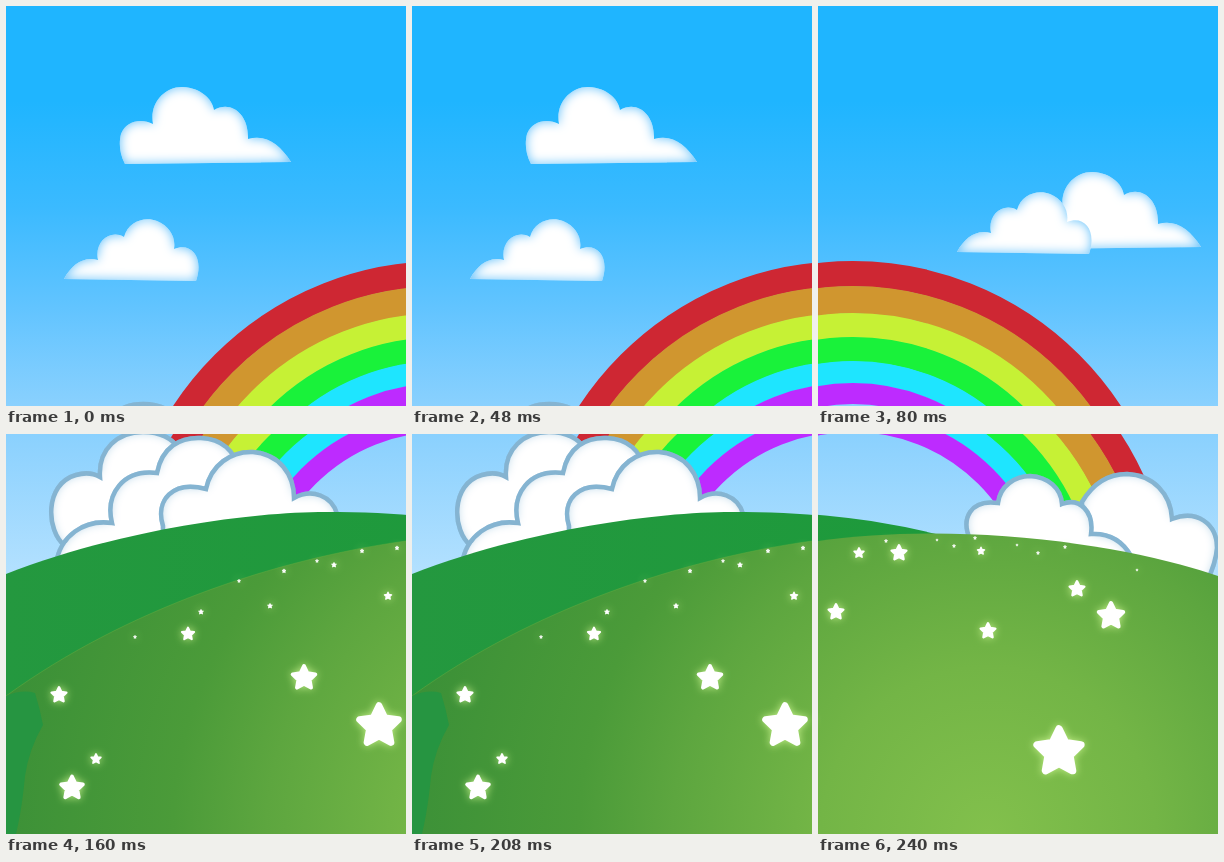
An HTML page that plays this animation: 400x400 px, repeating every 320 ms.

```html
<!DOCTYPE html>
<html lang="en">
<head>
<meta charset="utf-8">
<title>Rainbow meadow</title>
<style>
  html, body { margin: 0; width: 100%; height: 100%; overflow: hidden; }
  body { position: relative; background: #1fb5ff; }
  svg {
    position: absolute; left: 0; top: 0; width: 200%; height: 200%;
    will-change: transform;
    animation: look 320ms step-end infinite;
  }
  /* The view jumps between the four quarters of the scene. */
  @keyframes look {
    0%   { transform: translate(0, 0); }
    25%  { transform: translate(-50%, 0); }
    50%  { transform: translate(0, -50%); }
    75%  { transform: translate(-50%, -50%); }
    100% { transform: translate(-50%, -50%); }
  }
  #rainbow { fill: none; }
  .high { fill: #fff; filter: url(#airy); }
  .low path { fill: #fff; stroke: #86b3cf; stroke-width: 4.5; filter: url(#shaded); }
  #stars { fill: #fff; stroke: #fff; stroke-linejoin: round; filter: url(#glow); }
</style>
</head>
<body>
<svg viewBox="0 0 800 800">
  <defs>
    <linearGradient id="sky" gradientUnits="userSpaceOnUse" x1="0" y1="0" x2="0" y2="560">
      <stop offset=".17" stop-color="#1fb5ff"/>
      <stop offset=".36" stop-color="#3bbaff"/>
      <stop offset=".54" stop-color="#62c4ff"/>
      <stop offset=".72" stop-color="#8bd1fe"/>
      <stop offset="1" stop-color="#b9e3ff"/>
    </linearGradient>
    <radialGradient id="grass" gradientUnits="userSpaceOnUse" cx="570" cy="800" r="620">
      <stop offset="0" stop-color="#82c04c"/>
      <stop offset=".27" stop-color="#73b546"/>
      <stop offset=".5" stop-color="#5da63f"/>
      <stop offset=".65" stop-color="#4b9b39"/>
      <stop offset="1" stop-color="#388e37"/>
    </radialGradient>
    <linearGradient id="farGrass" x1="0" x2="1">
      <stop offset="0" stop-color="#24983f"/>
      <stop offset="1" stop-color="#1d9a3b"/>
    </linearGradient>
    <filter id="airy" color-interpolation-filters="sRGB">
      <feComponentTransfer in="SourceAlpha"><feFuncA type="table" tableValues="1 0"/></feComponentTransfer>
      <feGaussianBlur stdDeviation="5.5" result="rim"/>
      <feFlood flood-color="#62c0fa"/>
      <feComposite in2="rim" operator="in"/>
      <feComposite in2="SourceAlpha" operator="in" result="tint"/>
      <feMerge><feMergeNode in="SourceGraphic"/><feMergeNode in="tint"/></feMerge>
    </filter>
    <filter id="shaded" color-interpolation-filters="sRGB">
      <feComponentTransfer in="SourceAlpha"><feFuncA type="table" tableValues="1 0"/></feComponentTransfer>
      <feGaussianBlur stdDeviation="6" result="rim"/>
      <feFlood flood-color="#83b6d6"/>
      <feComposite in2="rim" operator="in"/>
      <feComposite in2="SourceAlpha" operator="in" result="tint"/>
      <feMerge><feMergeNode in="SourceGraphic"/><feMergeNode in="tint"/></feMerge>
    </filter>
    <filter id="glow" filterUnits="userSpaceOnUse" x="0" y="480" width="800" height="320" color-interpolation-filters="sRGB">
      <feGaussianBlur in="SourceAlpha" stdDeviation="4.5" result="halo"/>
      <feFlood flood-color="#c4f08a"/>
      <feComposite in2="halo" operator="in" result="light"/>
      <feMerge><feMergeNode in="light"/><feMergeNode in="SourceGraphic"/></feMerge>
    </filter>
    <path id="cloudA" d="M119 158C113 147 113 136 115 128C120 115 135 112 147 118C143 96 160 80 177 81C194 82 206 92 208 104C225 94 243 108 242 133C261 128 274 139 285 156Z"/>
    <path id="cloudB" d="M58 273C66 258 78 250 92 254C88 236 104 223 118 231C122 216 138 210 151 215C164 220 170 232 168 243C186 236 198 252 190 275Z"/>
  </defs>

  <rect width="800" height="800" fill="url(#sky)"/>
  <use href="#cloudA" class="high"/>
  <use href="#cloudB" class="high"/>
  <use href="#cloudA" class="high" x="498" y="85"/>
  <use href="#cloudB" class="high" x="481" y="-27"/>

  <g id="rainbow"></g>

  <g class="low">
    <path d="M59 512C40 497 38 450 70 441C80 438 87 439 94 443C92 415 112 398 137 398C155 398 167 405 174 416V560H59Z"/>
    <path d="M50 530C54 502 78 485 106 489C99 460 117 435 151 439C156 413 174 403 195 404C216 405 229 417 232 435V560H50Z"/>
    <path d="M157 492C149 466 167 446 200 455C205 431 225 417 247 418C273 420 288 440 288 464C306 454 326 462 331 480V520H157Z"/>
    <path d="M262 670L664 468C676 448 692 440 709 440C735 441 753 460 754 485C778 476 399 0 754 485C780 475 800 492 799 516C798 528 795 536 790 545H664V468Z" visibility="hidden"/>
    <path d="M664 468C676 448 692 440 709 440C735 441 753 460 754 485C779 475 799 490 799 514C798 526 795 535 789 547H664Z"/>
    <path d="M552 505C543 485 552 465 580 469C582 452 597 442 612 442C630 443 643 454 644 470C662 463 676 478 673 500C691 499 704 506 713 522V540H552Z"/>
  </g>

  <path fill="url(#farGrass)" d="M0 540C110 497 240 478 320 478S460 485 530 503V800H0Z"/>
  <path fill="url(#grass)" d="M0 662C120 575 270 525 400 507S690 505 800 542V800H0Z"/>
  <path fill="none" stroke="#6bad3f" stroke-opacity=".45" d="M0 662C120 575 270 525 400 507"/>
  <path fill="#269541" d="M0 662Q16 655 29 659Q34 675 37 691Q23 715 19 742Q16 775 10 800H0Z"/>
  <g id="stars"></g>
</svg>
<script>
  const bands = [
    ['#ce2733', 320], ['#d0962f', 295], ['#c6f135', 268],
    ['#19f23a', 244], ['#1ee5ff', 220], ['#bd2bff', 198]
  ];
  const innerRadius = 177;
  document.getElementById('rainbow').innerHTML = bands.map(([color, outer], i) => {
    const inner = i + 1 < bands.length ? bands[i + 1][1] - 0.5 : innerRadius;
    return `<circle cx="435" cy="575" r="${(outer + inner) / 2}" stroke="${color}" stroke-width="${outer - inner}"/>`;
  }).join('');

  // x, y, radius
  const stars = [
    [53, 661, 9], [66, 754, 13.5], [90, 725, 6], [182, 600, 7.5], [298, 644, 14],
    [373, 692, 24], [382, 562, 4.5], [195, 578, 3], [264, 572, 3], [129, 603, 2],
    [233, 547, 2], [278, 537, 2.5], [311, 527, 2], [328, 531, 3], [356, 517, 2.5],
    [391, 514, 2.5], [441, 519, 6], [481, 519, 9], [418, 578, 9], [570, 597, 9],
    [563, 517, 4.5], [659, 555, 9], [693, 582, 15], [641, 718, 27], [468, 507, 2],
    [519, 506, 1.5], [536, 512, 2], [557, 504, 2], [599, 511, 1.5], [620, 519, 2],
    [647, 513, 2], [719, 536, 1.5]
  ];
  const starPoints = Array.from({ length: 10 }, (_, i) => {
    const radius = i % 2 ? 0.42 : 0.85;
    const angle = i * Math.PI / 5;
    return `${(radius * Math.sin(angle)).toFixed(3)},${(-radius * Math.cos(angle)).toFixed(3)}`;
  }).join(' ');
  document.getElementById('stars').innerHTML = stars.map(([x, y, r]) =>
    `<polygon points="${starPoints}" stroke-width=".28" transform="translate(${x} ${y}) scale(${r})"/>`
  ).join('');
</script>
</body>
</html>
```
